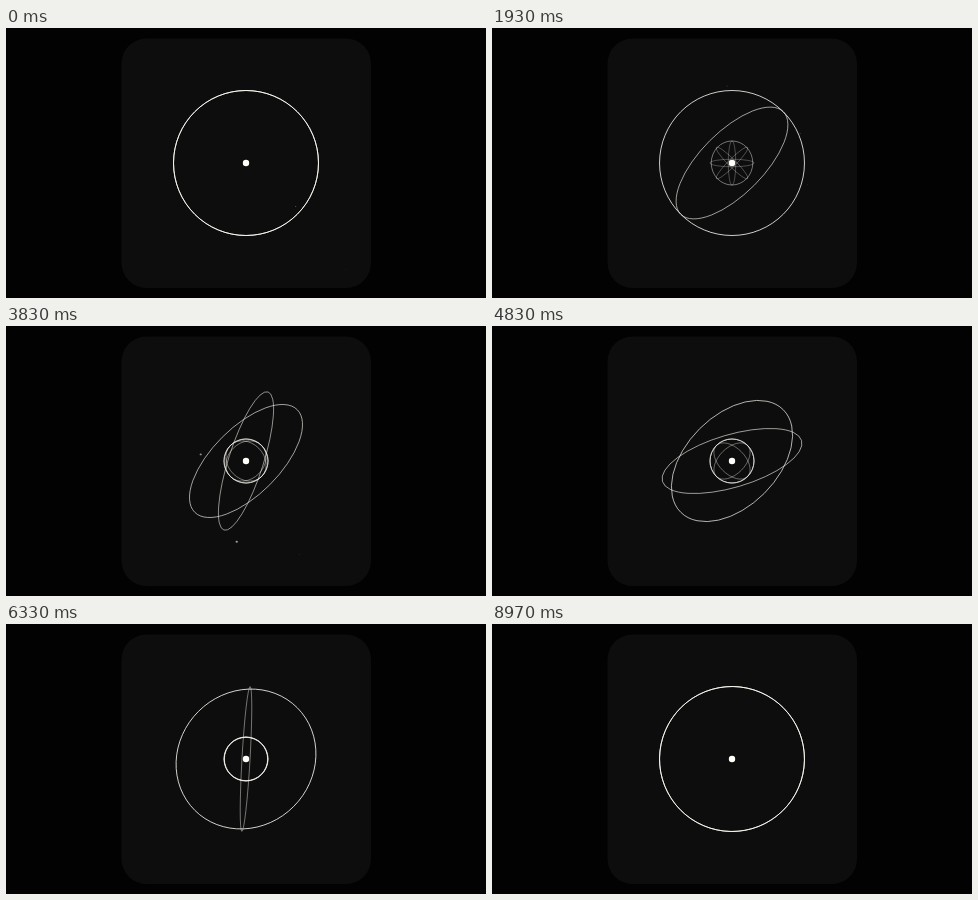
Animation, 480 px wide and 270 px high, one loop 9010 ms. Source, as an HTML page:

```html
<!DOCTYPE html>
<html lang="en">
<head>
<meta charset="utf-8">
<title>Orbit rings</title>
<style>
html, body { margin: 0; width: 100%; height: 100%; overflow: hidden; background: #020202; }
svg { display: block; width: 100vw; height: 100vh; }
</style>
</head>
<body>
<svg viewBox="0 0 480 270">
  <rect width="480" height="270" fill="#020202"/>
  <rect y="266" width="480" height="4" fill="#040103"/>
  <rect x="115.5" y="10.5" width="249.5" height="249.5" rx="25" fill="#0d0d0d"/>
  <g id="rings" transform="translate(240 135)" fill="none" stroke="#fffdf5"></g>
  <circle cx="240" cy="135" r="3.2" fill="#fffefa"/>
  <g id="dust" fill="#d8d8d0"></g>
</svg>
<script>
const LOOP = 9010, PHASES = 3, STEPS = 270;
const SVG = "http://www.w3.org/2000/svg";

const hump = u => Math.sin(Math.PI * u) ** 2;
const rise = (u, power) => Math.sin(Math.PI * u / 2) ** power;

// Each pose maps a phase (0 to 2) and its progress u to [axis, tilt] in degrees.
// Tilt 0 faces the viewer, 90 is edge-on.
function diagonalRing(phase, u) {
  return [45, 180 * (phase + u) + (phase ? 22 * hump(u) : 0)];
}

function turningRing(phase, u) {
  if (phase === 0) return [90, 270 * Math.min(1, u * 1.027)];
  const tilt = phase === 1 ? 24 * hump(u) : 90 * u ** 1.5;
  return [90 - 180 * u ** 1.8, 270 + tilt];
}

function coreRing(phase, u) {
  const tilts = [90 * (1 - u) ** 1.5, 0, 90 * rise(u, 8)];
  return [90, tilts[phase]];
}

const petal = axis => (phase, u) => {
  const opening = axis % 90 ? 60 * hump(u) : 0;
  const tilts = [90 * (1 - u ** 5), opening, 90 * rise(u, 1.2)];
  return [axis, tilts[phase]];
};

function add(parent, name, attrs) {
  const node = parent.appendChild(document.createElementNS(SVG, name));
  for (const key in attrs) node.setAttribute(key, attrs[key]);
  return node;
}

const ringLayer = document.getElementById("rings");
const dustLayer = document.getElementById("dust");

function makeRing(pose, r, width) {
  return { pose, node: add(ringLayer, "circle", { r, "stroke-width": width }) };
}

const rings = [
  ...[diagonalRing, turningRing].map(pose => makeRing(pose, 72.5, .8)),
  ...[coreRing, ...[0, 45, 90, 135].map(petal)].map(pose => makeRing(pose, 22, .45))
];

function random(seed) {
  const s = Math.sin(seed * 127.1 + 11.7) * 43758.5453;
  return s - Math.floor(s);
}

let lastStep = -1;

function drawDust(step) {
  if (step === lastStep) return;
  lastStep = step;
  dustLayer.replaceChildren();
  const count = Math.floor(random(step) * 4);
  for (let i = 0; i < count; i++) {
    const seed = step * 13 + i * 3.7;
    const size = .4 + .8 * random(seed + 2) ** 2;
    add(dustLayer, "ellipse", {
      cx: 120 + 240 * random(seed), cy: 14 + 240 * random(seed + 1),
      rx: size, ry: size * .8, opacity: size * .6
    });
  }
}

function draw(time) {
  const progress = time / LOOP * PHASES;
  const phase = Math.floor(progress);
  for (const { pose, node } of rings) {
    const [axis, tilt] = pose(phase, progress - phase);
    const squash = Math.abs(Math.cos(tilt * Math.PI / 180));
    node.setAttribute("visibility", squash < .02 ? "hidden" : "visible");
    // Squashing the stroke too makes the sides of a tilted ring fade.
    node.setAttribute("transform", `rotate(${-axis}) scale(1 ${Math.max(squash, .001)})`);
  }
  drawDust(Math.floor(time * STEPS / LOOP));
}

const start = performance.now();
function tick() {
  draw((performance.now() - start) % LOOP);
  requestAnimationFrame(tick);
}
tick();
</script>
</body>
</html>
```
